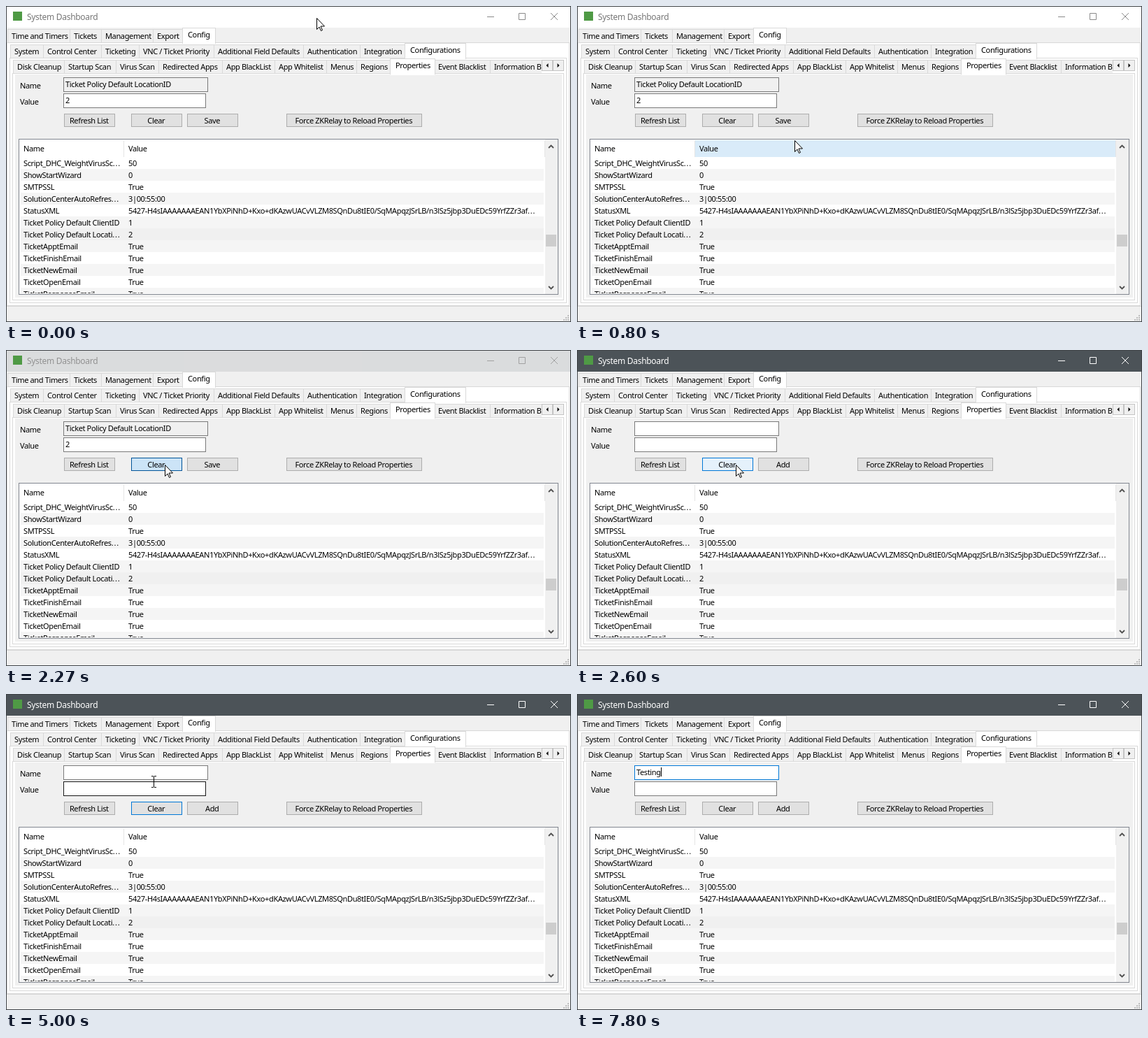
An HTML page that plays this animation: 808x452 px, repeating every 8000 ms.

```html
<!DOCTYPE html>
<html lang="en">
<head>
<meta charset="utf-8">
<title>System Dashboard</title>
<style>
  html, body { margin: 0; width: 100%; height: 100%; overflow: hidden; background: #f0f0f0; }
  svg { display: block; }
  text { font: 11px "Noto Sans", "Open Sans", sans-serif; letter-spacing: -.36px; white-space: pre; }
  .title { font-size: 12px; letter-spacing: -.3px; }
  .mid { text-anchor: middle; }
  .dots { letter-spacing: .8px; }
  .line { fill: none; stroke-width: 1; }
</style>
</head>
<body>
<svg id="stage" width="808" height="452" viewBox="0 0 808 452"></svg>
<script>
const FPS = 15, LOOP = 8000;
const TAB_LINE = '#d9d9d9', FACE = '#f0f0f0', BLUE = '#0078d7', GREY = '#7a7a7a';

const rect = (x, y, w, h, fill, id = '') =>
  `<rect ${id && `id="${id}"`} x="${x}" y="${y}" width="${w}" height="${h}" fill="${fill}"/>`;
const box = (x, y, w, h, fill, stroke, id = '') =>
  `<rect ${id && `id="${id}"`} x="${x + .5}" y="${y + .5}" width="${w - 1}" height="${h - 1}" fill="${fill}" stroke="${stroke}"/>`;
const line = (d, stroke, extra = '') => `<path class="line" d="${d}" stroke="${stroke}" ${extra}/>`;
const text = (x, y, s, id = '', cls = '', fill = '#000') =>
  `<text ${id && `id="${id}"`} class="${cls}" x="${x}" y="${y}" fill="${fill}">${s}</text>`;
const button = (x, w, s, id) =>
  box(x, 154, w, 19, '#e1e1e1', '#adadad', id) + text(x + w / 2 - .7, 168, s, id + 'Label', 'mid');

function titleBar(bg, ink, controls) {
  return rect(1, 1, 806, 30, bg) + text(30, 20, 'System Dashboard', '', 'title', ink) +
    line('M688 15.5h10M733.5 10.5h9v9h-9zM779 10l10 10M789 10l-10 10', controls);
}

// Each tab is [left edge, label]; the selected one is raised and drawn on top.
function tabRow(top, tabs, end, selected) {
  const draw = i => {
    const [x, label] = tabs[i], right = i + 1 < tabs.length ? tabs[i + 1][0] : end;
    const on = i === selected;
    return (on ? box(x - 2, top - 2, right - x + 4, 23, '#fff', TAB_LINE) +
                 rect(x - 1, top + 19, right - x + 2, 3, '#fff')
               : box(x, top, right - x + 1, 20, FACE, TAB_LINE)) +
      text(x + 6, top + (on ? 12 : 14), label);
  };
  return tabs.map((_, i) => i === selected ? '' : draw(i)).join('') + draw(selected);
}

function listView() {
  const rows = [
    ['Script_DHC_WeightVirusSc...', '50'],
    ['ShowStartWizard', '0'],
    ['SMTPSSL', 'True'],
    ['SolutionCenterAutoRefres...', '3|00:55:00'],
    ['StatusXML', '5427-H4sIAAAAAAAEAN1YbXPiNhD+Kxo+dKAzwUACvVLZM8SQnDu8tIE0/SqMApqzJSrLB/n3lSz5jbp3DuEDc59YrfZZr3af...'
      .slice(0, 0) + '5427-H4sIAAAAAAAEAN1YbXPiNhD+Kxo+dKAzwUACvVLZM8SQnDu8tIE0/SqMApqzJSrLB/n3lSz5jbp3DuEDc59YrfZZr3af...'.slice(0, 0) +
      '5427-H4sIAAAAAAAEAN1YbXPiNhD+Kxo+dKAzwUACvVLZM8SQnDu8tIE0/SqMApqzJSrLB/n3lSz5jbp3DuEDc59YrfZZr3af...'],
    ['Ticket Policy Default ClientID', '1'],
    ['Ticket Policy Default Locati...', '2'],
    ...['Appt', 'Finish', 'New', 'Open', 'Response'].map(s => [`Ticket${s}Email`, 'True'])
  ];
  const cell = (x, y, s) => text(x, y, s.replace('...', '<tspan class="dots">...</tspan>'));
  const body = rows.map(([name, value], i) => {
    const y = 216 + 17 * i;
    return rect(21, y, 748, 17, i === 6 ? '#f0f0f0' : i % 2 ? '#f5f5f5' : '#fff') +
      cell(25, y + 13, name) + cell(175, y + 13, value);
  }).join('');
  return box(18, 190, 772, 223, '#fff', '#828790') +
    `<g clip-path="url(#listClip)">${body}</g>` +
    rect(169, 192, 602, 24, '#d9ebf9', 'headerHover') +
    line('M168.5 192v24M770.5 192v24', '#e5e5e5') +
    text(25, 208, 'Name') + text(175, 208, 'Value') +
    rect(771, 191, 18, 221, FACE) + rect(772, 327, 15, 17, '#cdcdcd') +
    line('M776 203l3.5-3.5 3.5 3.5M776 401l3.5 3.5 3.5-3.5', '#505050', 'style="stroke-width:1.8"');
}

function grip() {
  let s = '';
  for (let i = 0; i < 3; i++)
    for (let j = 0; j <= i; j++) s += rect(803 - 3 * j, 442 + 3 * i, 2, 2, '#bfbfbf');
  return s;
}

document.getElementById('stage').innerHTML =
  `<defs><clipPath id="listClip"><rect x="19" y="216" width="752" height="195"/></clipPath>
   <clipPath id="tabClip"><rect x="8" y="70" width="758" height="30"/></clipPath></defs>` +
  rect(0, 0, 808, 452, FACE) +
  titleBar('#fff', '#777', '#8a8a8a') +
  `<g id="active">${titleBar('#4c5358', '#fff', '#fff')}</g>` +
  rect(10, 8, 13, 13, '#4f9a45') +
  box(1, 52, 805, 377, '#fff', TAB_LINE) +
  tabRow(33, [[2, 'Time and Timers'], [91, 'Tickets'], [136, 'Management'], [210, 'Export'], [254, 'Config']], 298, 4) +
  box(5, 74, 797, 351, '#fff', TAB_LINE) +
  tabRow(55, [[6, 'System'], [53, 'Control Center'], [136, 'Ticketing'], [190, 'VNC / Ticket Priority'],
    [297, 'Additional Field Defaults'], [425, 'Authentication'], [506, 'Integration'], [572, 'Configurations']], 656, 7) +
  box(9, 96, 789, 325, '#fff', TAB_LINE) +
  rect(13, 98, 782, 319, FACE) +
  `<g clip-path="url(#tabClip)">` +
  tabRow(77, [[10, 'Disk Cleanup'], [83, 'Startup Scan'], [157, 'Virus Scan'], [218, 'Redirected Apps'],
    [309, 'App BlackList'], [384, 'App Whitelist'], [458, 'Menus'], [501, 'Regions'], [551, 'Properties'],
    [612, 'Event Blacklist'], [692, 'Information Base']], 790, 8) + '</g>' +
  box(766, 77, 16, 16, FACE, '#c4c4c4') + box(782, 77, 16, 16, FACE, '#c4c4c4') +
  '<path d="M775.5 82v6l-3-3zM788.5 82v6l3-3z"/>' +
  text(20, 118, 'Name') + text(20, 141, 'Value') +
  box(82, 102, 207, 21, '#fff', GREY, 'nameBox') + text(85, 116, '', 'nameText') +
  box(82, 125, 204, 21, '#fff', GREY, 'valueBox') + text(85, 139, '', 'valueText') +
  rect(85, 105, 1, 13, '#000', 'caret') +
  button(83, 73, 'Refresh List', 'refresh') + button(179, 73, 'Clear', 'clear') +
  button(259, 73, 'Save', 'save') + button(401, 194, 'Force ZKRelay to Reload Properties', 'force') +
  listView() +
  line('M1 429.5h806', '#d7d7d7') + grip() +
  box(0, 0, 808, 452, 'none', '#3f4347') +
  `<path id="arrow" d="M.5 .5v16l3.5-3.5 2.5 5.5 2-1-2.5-5.5h5.5z" fill="#fff" stroke="#000"/>
   <g id="beam">${line('M-3 .5h3M1 .5h3M.5 1v15M-3 16.5h3M1 16.5h3', '#000')}${rect(-1, 15, 3, 1, '#e59a62', 'spark')}</g>`;

const el = id => document.getElementById(id);
const show = (id, on) => el(id).setAttribute('visibility', on ? 'visible' : 'hidden');
const paint = (id, fill, stroke) => {
  el(id).setAttribute('fill', fill);
  el(id).setAttribute('stroke', stroke);
};

// Pointer waypoints: tick, x, y.
const path = [
  [3, 444, 17], [5, 436, 42], [8, 388, 126], [11, 323, 188], [12, 311, 192], [13, 288, 191],
  [14, 260, 183], [16, 231, 167], [19, 227, 165], [22, 227, 165], [23, 227, 164],
  [66, 227, 164], [67, 225, 160], [70, 220, 148], [74, 212, 128], [79, 207, 115],
  [91, 207, 115], [92, 214, 116]
];
const typedAt = [103, 104, 106, 109, 115, 116, 117];

function pointer(k) {
  const i = path.findIndex(p => p[0] >= k);
  if (i < 0) return path[path.length - 1].slice(1);
  if (i === 0) return path[0].slice(1);
  const [a, ax, ay] = path[i - 1], [b, bx, by] = path[i];
  const f = (k - a) / (b - a);
  return [Math.round(ax + (bx - ax) * f), Math.round(ay + (by - ay) * f)];
}

function render(t) {
  const k = Math.floor((t + 4) * FPS / 1000);
  const [x, y] = pointer(k);
  const cleared = k >= 36, focused = k >= 83;
  const inName = k > 66 && y >= 102 && y < 123, inValue = k > 66 && y >= 125 && y < 146;
  const overClear = k >= 17 && y >= 154;
  const typed = typedAt.filter(n => n <= k).length;

  el('active').style.opacity = Math.min(1, Math.max(0, (k - 33) / 5));
  show('headerHover', k >= 11 && k <= 13);

  paint('nameBox', cleared ? '#fff' : FACE, focused ? BLUE : inName ? '#171717' : GREY);
  paint('valueBox', '#fff', inValue ? '#171717' : GREY);
  el('nameText').textContent = cleared ? 'Testing'.slice(0, typed) : 'Ticket Policy Default LocationID';
  el('valueText').textContent = cleared ? '' : '2';
  el('saveLabel').textContent = cleared ? 'Add' : 'Save';

  const pressed = k >= 34 && k < 36;
  const hasFocus = k >= 34 && !focused;
  paint('clear', pressed ? '#cce4f7' : overClear ? '#e5f1fb' : '#e1e1e1',
    pressed ? '#005499' : overClear || hasFocus ? BLUE : '#adadad');

  show('caret', focused && (k < 94 || k >= 102));
  el('caret').setAttribute('x', 85 + (typed ? Math.round(el('nameText').getComputedTextLength()) : 0));

  const beam = inName || inValue;
  show('arrow', !beam);
  show('beam', beam && !typed);
  show('spark', beam && focused && k < 92 && !typed);
  el('arrow').setAttribute('transform', `translate(${x} ${y})`);
  el('beam').setAttribute('transform', `translate(${x} ${y - 8})`);
}

const start = performance.now();
function tick() {
  render((performance.now() - start) % LOOP);
  requestAnimationFrame(tick);
}
tick();
</script>
</body>
</html>
```
